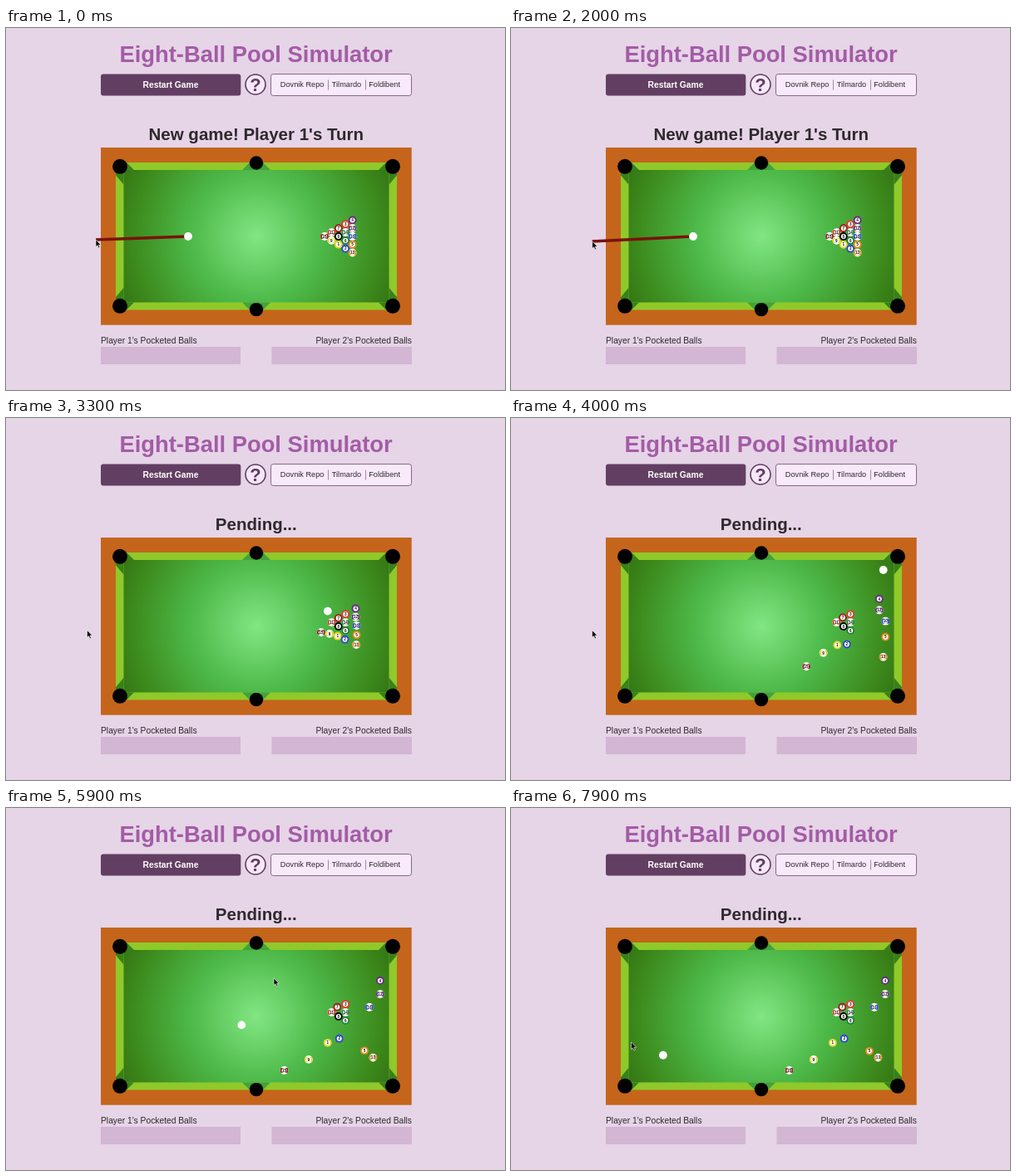
Animation of 600x436 px, one loop 8 s. Source, as an HTML page:

```html
<!DOCTYPE html>
<html lang="en">
<head>
<meta charset="utf-8">
<title>Eight-Ball Pool Simulator</title>
<style>
html, body { margin: 0; width: 100%; height: 100%; overflow: hidden; background: #e6d4e7; }
svg { display: block; width: 600px; height: 436px; font: 10.27px "Liberation Sans", Arial, sans-serif; fill: #2e292d; }
.bold { font-weight: bold; }
.mid { text-anchor: middle; }
.num { font: bold 4.6px "Liberation Sans", Arial, sans-serif; text-anchor: middle; fill: #111; }
</style>
</head>
<body>
<svg viewBox="0 0 600 436">
  <defs>
    <radialGradient id="felt" gradientUnits="userSpaceOnUse" cx="301" cy="251" r="180">
      <stop offset="0" stop-color="#82e683"/>
      <stop offset=".45" stop-color="#4cb848"/>
      <stop offset=".82" stop-color="#3d8b1d"/>
      <stop offset="1" stop-color="#347513"/>
    </radialGradient>
    <clipPath id="round"><circle r="4.9"/></clipPath>
  </defs>

  <text class="bold mid" x="300.6" y="41.3" font-size="27.35" fill="#a35ca6">Eight-Ball Pool Simulator</text>
  <rect x="114" y="55.5" width="168.3" height="26" rx="3" fill="#623f62"/>
  <text class="bold mid" x="198" y="72" fill="#fff">Restart Game</text>
  <circle cx="300" cy="68" r="12" fill="#f7e8f9" stroke="#5f3d60" stroke-width="1.6"/>
  <text class="bold mid" x="300" y="75.6" font-size="22" fill="#5f3d60">?</text>
  <rect x="318.5" y="55.5" width="169" height="26" rx="3" fill="#f8e9fb" stroke="#643f66" stroke-width=".75"/>
  <g font-size="9.2">
    <text x="329.8" y="71">Dovnik Repo</text>
    <text x="391.8" y="71">Tilmardo</text>
    <text x="436.2" y="71">Foldibent</text>
  </g>
  <path d="M387.5 62.5V74.5M432.5 62.5V74.5" stroke="#a58aa7"/>
  <text class="bold mid" id="status" x="300.8" y="135" font-size="20.5"></text>

  <rect x="114" y="144" width="373.7" height="213.7" fill="#c4651b"/>
  <rect x="132" y="162" width="338" height="177.5" fill="#8fc92a"/>
  <rect x="141.5" y="171" width="319" height="159.5" fill="url(#felt)"/>
  <g id="pockets" fill="#000"></g>

  <text x="114" y="380">Player 1's Pocketed Balls</text>
  <text x="488" y="380" text-anchor="end">Player 2's Pocketed Balls</text>
  <path d="M114 384H282V405H114ZM319.5 384H488V405H319.5Z" fill="#d2b6d3"/>

  <line id="stick" x2="219" y2="251" stroke="#7a120a" stroke-width="3.7"/>
  <g id="balls"></g>
  <path id="cursor" d="M0 0V8.6L2 6.8L3.4 10L4.9 9.3L3.5 6.3H6.2Z" fill="#000" stroke="#fff" stroke-width=".6"/>
</svg>
<script>
const $ = id => document.getElementById(id);
const clamp = u => Math.min(1, Math.max(0, u));
const mix = (a, b, u) => a + (b - a) * u;
const place = (el, x, y) => el.setAttribute('transform', `translate(${x.toFixed(2)} ${y.toFixed(2)})`);

// Pockets: one corner and one side shape, mirrored about the table centre
for (const sy of [1, -1]) {
  const group = (sx, shapes) =>
    $('pockets').innerHTML += `<g transform="translate(301 250.8) scale(${sx} ${sy})">${shapes}</g>`;
  for (const sx of [1, -1])
    group(sx, `<path d="M-169 -88.8H-156L-147 -79.8H-159.5V-62L-169 -73.5Z" fill="#37811a"/>
      <circle cx="-164" cy="-84" r="9"/>`);
  group(1, `<path d="M-8 -88.8H8L17 -79.8H-17Z" fill="#42a23b"/><circle cy="-88.3" r="8.2"/>`);
}

const COLORS = ['#e9d82c', '#2948d8', '#e5392c', '#6b2b86', '#ea8a1c', '#25803a', '#9c1f1c'];
const RACK = [[15], [11, 9], [7, 8, 1], [3, 14, 6, 2], [4, 12, 10, 5, 13]];
const SHOT = 2.6, BREAK = 3.2, ROLL = 2.3;

// Distance each ball rolls after the break, ignoring the cushions
const ROLLS = {
  15: [-48.5, 84], 9: [-27.5, 47], 1: [-13, 22], 2: [-7.5, 12], 7: [-1.5, -1.5],
  4: [45.5, -23.5], 12: [45.5, -17], 10: [58.5, -11], 5: [58.5, 5], 13: [54, 30]
};

const push = (x, y, at = BREAK, time = ROLL) => ({ x, y, at, time });

// Constant friction: full speed at the push, rest at its end
const slide = (p, t) => 1 - (1 - clamp((t - p.at) / p.time)) ** 2;

function bounce(v, min, max) {
  const span = max - min, u = (v - min) / span;
  return min + span * Math.abs(u - 2 * Math.round(u / 2));
}

function locate({ x, y, pushes }, t) {
  for (const p of pushes) {
    x += p.x * slide(p, t);
    y += p.y * slide(p, t);
  }
  return [bounce(x, 146, 456), bounce(y, 176, 325.5)];
}

function addBall(n) {
  const el = document.createElementNS('http://www.w3.org/2000/svg', 'g');
  const color = n === 8 ? '#000' : COLORS[(n - 1) % 8];
  const striped = n > 8;
  el.innerHTML = `<circle r="4.9" fill="${n && !striped ? color : '#fff'}"/>` +
    (striped ? `<rect x="-5" y="-3" width="10" height="6" fill="${color}" clip-path="url(#round)"/>` : '') +
    (n ? `<circle r="3" fill="#fff"/><text class="num" y="1.65">${n}</text>` : '');
  $('balls').append(el);
  return el;
}

const balls = RACK.flatMap((row, i) => row.map((n, j) => ({
  n, el: addBall(n),
  x: 383 + i * 8.4, y: 251 + (j - i / 2) * 9.8,
  pushes: ROLLS[n] ? [push(...ROLLS[n])] : []
})));
balls.find(b => b.n === 5).pushes.push(push(-6 * -1, 27, 4.6, 1.5));   // late second hit

// The cue ball glances off the rack: a long roll plus a short upward kick
const cue = {
  el: addBall(0), x: 375, y: 243.5,
  pushes: [push(381, -138, BREAK, 6.4), push(0, -61, BREAK, 1.8)]
};

// Pointer keys: time, x, y
const POINTER = [
  [0, 108, 255], [.9, 95.5, 251], [2, 97.7, 257], [2.5, 97.5, 255.7],
  [4.9, 97.5, 255.7], [5.9, 322, 205], [7.9, 144.5, 282]
];

function pointerAt(t) {
  const i = Math.max(1, POINTER.findIndex(key => key[0] >= t));
  const [a, b] = [POINTER[i - 1], POINTER[i]];
  const u = (t - a[0]) / (b[0] - a[0]), eased = u * u * (3 - 2 * u);
  return [mix(a[1], b[1], eased), mix(a[2], b[2], eased)];
}

function draw() {
  const t = Math.floor(performance.now() % 8000 / 100) / 10;
  const aiming = t <= SHOT;
  const [px, py] = pointerAt(t);
  $('status').textContent = aiming ? "New game! Player 1's Turn" : 'Pending...';
  $('stick').style.display = aiming ? '' : 'none';
  $('stick').setAttribute('x1', px);
  $('stick').setAttribute('y1', py);
  place($('cursor'), px, py);

  for (const ball of balls) place(ball.el, ...locate(ball, t));
  const run = clamp((t - SHOT) / (BREAK - SHOT));
  if (run < 1) place(cue.el, mix(219, cue.x, run), mix(251, cue.y, run));
  else place(cue.el, ...locate(cue, t));
  requestAnimationFrame(draw);
}
draw();
</script>
</body>
</html>
```
